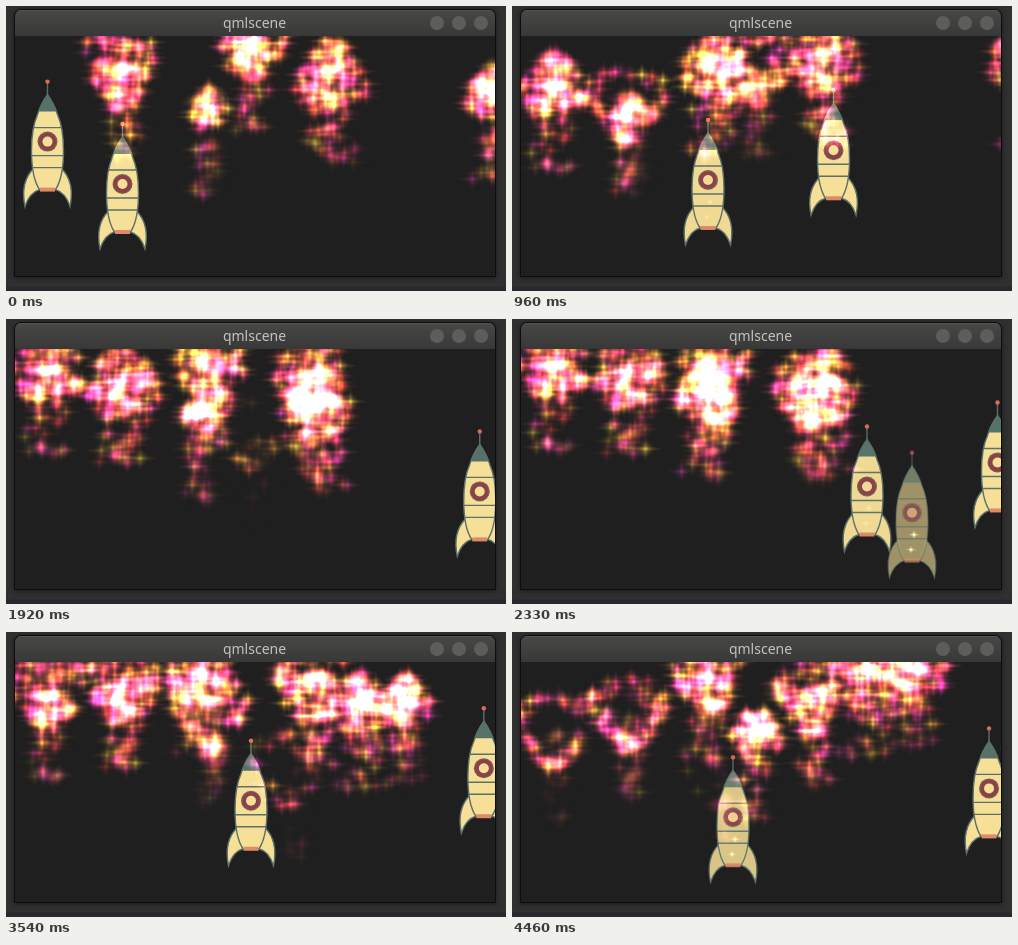
An HTML page with a canvas for the animation above (4.5 s loop, 500 by 285 pixels).

```html
<!DOCTYPE html>
<html lang="en">
<head>
<meta charset="utf-8">
<title>Rockets</title>
<style>
  html, body { margin: 0; width: 100%; height: 100%; overflow: hidden; }
  body { position: relative; background: linear-gradient(#303030 280px, #2a282e 281px); }
  .window {
    position: absolute; left: 9px; top: 4px; width: 480px; height: 266px;
    border-radius: 6px 6px 0 0; background: #1f1f1f; overflow: hidden;
  }
  .shadow {
    position: absolute; left: 8px; top: 3px; width: 482px; height: 268px;
    border-radius: 7px 7px 0 0; background: #0d0d0d; box-shadow: 0 1px 5px #1a1a1a;
  }
  .bar {
    position: absolute; left: 0; top: 0; width: 100%; height: 26px;
    background: linear-gradient(#484846, #383838); box-shadow: inset 0 1px #555;
  }
  .bar span {
    position: absolute; left: 0; width: 479px; top: 0; text-align: center;
    font: 14px/26px "Noto Sans", "Open Sans", sans-serif; color: #c2c2be;
  }
  .bar i {
    position: absolute; top: 6px; width: 14px; height: 14px;
    border-radius: 50%; background: #5d5d5c;
  }
  canvas { position: absolute; left: 0; top: 26px; }
</style>
</head>
<body>
<div class="shadow"></div>
<div class="window">
  <div class="bar"><span>qmlscene</span>
    <i style="left:415px"></i><i style="left:437px"></i><i style="left:459px"></i>
  </div>
  <canvas width="480" height="240"></canvas>
</div>
<script>
const ctx = document.querySelector('canvas').getContext('2d');
const LOOP = 4500;
const clamp = v => Math.min(1, Math.max(0, v));

// The picture moves in half-second runs of short steps and rests between them.
const RUNS = [40, 580, 1210, 1790, 2330, 2880, 3420, 3960];
const RUN = 500, STEP = 40;

function stepTime(t) {
  const from = RUNS.filter(r => r <= t).pop();
  if (from === undefined) return 0;
  const past = t - from;
  return from + (past >= RUN ? RUN : Math.floor(past / STEP) * STEP);
}

function seeded(seed) {
  return () => {
    seed = (seed + 0x6D2B79F5) | 0;
    let n = Math.imul(seed ^ (seed >>> 15), 1 | seed);
    n = (n + Math.imul(n ^ (n >>> 7), 61 | n)) ^ n;
    return ((n ^ (n >>> 14)) >>> 0) / 4294967296;
  };
}

// ---- launches ----
const DRAG = 21;      // half the slowing, px/s²
const CENTRE = 60;    // from antenna tip to porthole
const launches = [];

// born in ms, x and antenna y at birth, speed in px/s, sideways pull, life in s
function launch(born, x, y, speed = 120, wind = 0, life = 1) {
  const rnd = seeded(launches.length * 977 + 31);
  const sparks = Array.from({ length: 165 }, (_, i) => ({
    tail: i >= 110,
    angle: rnd() * Math.PI * 2,
    u: rnd(), v: rnd(), w: rnd(),
    hue: Math.floor(rnd() * HUES)
  }));
  launches.push({ born, x, y, speed, wind, life, sparks });
}

const place = (l, age) => ({
  x: l.x + l.wind * age * age,
  y: l.y - l.speed * age + DRAG * age * age
});

// ---- sparks ----
const SIZE = 36, HUES = 9;

function makeSpark(color) {
  const c = document.createElement('canvas');
  c.width = c.height = SIZE;
  const g = c.getContext('2d');
  g.globalCompositeOperation = 'lighter';
  g.translate(SIZE / 2, SIZE / 2);
  const glow = (rx, ry, alpha) => {
    const grad = g.createRadialGradient(0, 0, 0, 0, 0, 1);
    grad.addColorStop(0, `hsla(${color},${alpha})`);
    grad.addColorStop(0.4, `hsla(${color},${alpha * 0.45})`);
    grad.addColorStop(1, `hsla(${color},0)`);
    g.save();
    g.scale(rx, ry);
    g.fillStyle = grad;
    g.fillRect(-1, -1, 2, 2);
    g.restore();
  };
  glow(8, 8, 0.55);
  glow(17, 2.4, 0.45);
  glow(2.4, 13, 0.45);
  return c;
}

// Hues run from magenta through red to yellow.
const SPARKS = Array.from({ length: HUES },
  (_, i) => makeSpark(`${320 + i * 85 / (HUES - 1)},95%,62%`));
const WHITE = makeSpark('50,100%,92%');

function drawSpark(img, x, y, alpha, size = SIZE) {
  if (alpha < 0.01) return;
  ctx.globalAlpha = Math.min(1, alpha);
  ctx.drawImage(img, x - size / 2, y - size / 2, size, size);
}

// ---- bursts: rise, fall back, and thin out into a ring ----
const FLIGHT = 4.4, RISE = 70, SPREAD = 36, TAIL = 90;

function drawBurst(l, t) {
  const age = (t - l.born) / 1000 - l.life;
  if (age <= 0 || age > 5) return;
  const from = place(l, l.life);
  const u = age / FLIGHT;
  const x = from.x + 2 * l.wind * l.life * age;
  const y = from.y + CENTRE - RISE * 4 * u * (1 - u);
  const rx = SPREAD * (1 - Math.exp(-age / 0.35));
  const ry = rx * 1.1;
  const lean = 0.6 * Math.cos(Math.PI * Math.min(1, u));
  const hollow = 0.65 * clamp((age - 3.2) / 0.8);

  for (const s of l.sparks) {
    const lit = clamp((age - s.w * 0.4) / 0.15) * clamp((3.4 + s.v * 1.7 - age) / 0.5);
    const alpha = lit * (0.75 + 0.25 * Math.sin(t / 130 + s.w * 40));
    const img = SPARKS[s.hue];
    if (s.tail) {
      const fall = Math.pow(s.u, 1.2);
      const side = (s.v + s.w - 1) * rx * (0.75 + 0.4 * lean);
      drawSpark(img, x + side, y + TAIL * fall, alpha * (0.95 - 0.55 * fall) * (1 - hollow));
    } else {
      const r = hollow + (1 - hollow) * Math.pow(s.u, 0.65);
      const down = r * Math.sin(s.angle);
      drawSpark(img, x + rx * r * Math.cos(s.angle) * (1 + lean * down), y + ry * down, alpha * 0.9);
    }
  }
}

// ---- rocket, drawn from the antenna tip down ----
const shape = d => new Path2D(d);
const STALK = shape('M0 1V15');
const BODY = shape('M0 13C-5 20-8 26-10 33C-15 44-16 56-16 69C-16 85-14 99-8 108H8C14 99 16 85 16 69C16 56 15 44 10 33C8 26 5 20 0 13Z');
const NOSE = shape('M0 13C-5 20-7 25-9 30H9C7 25 5 20 0 13Z');
const BANDS = shape('M-14 46H14M-16 74H16M-15 86H15');
const FIN = shape('M-14 87C-22 95-26 108-22.5 125C-20 117-15 110-8 108C-11 102-13 96-14 87Z');
const LINE = '#5b716a', CREAM = '#f6df97';

function dot(x, y, r, color) {
  ctx.fillStyle = color;
  ctx.beginPath();
  ctx.arc(x, y, r, 0, Math.PI * 2);
  ctx.fill();
}

function outlined(path) {
  ctx.fillStyle = CREAM;
  ctx.fill(path);
  ctx.stroke(path);
}

function paintRocket() {
  ctx.strokeStyle = LINE;
  ctx.lineWidth = 1.4;
  ctx.stroke(STALK);
  for (const side of [1, -1]) {
    ctx.save();
    ctx.scale(side, 1);
    outlined(FIN);
    ctx.restore();
  }
  outlined(BODY);
  ctx.fillStyle = '#55716a';
  ctx.fill(NOSE);
  ctx.stroke(BANDS);
  ctx.fillStyle = '#e18a68';
  ctx.fillRect(-7.5, 106, 15, 4);
  dot(0, CENTRE, 10, '#786058');
  dot(0, CENTRE, 8.8, '#8c4148');
  dot(0, CENTRE, 5, CREAM);
  dot(0, 0, 2.2, '#e06a55');
}

function drawRocket(l, t) {
  const age = (t - l.born) / 1000;
  if (age < 0 || age >= l.life) return;
  const { x, y } = place(l, age);
  const fade = clamp(age / 0.3);
  ctx.globalAlpha = Math.min(fade, clamp((l.life - age) / 0.12));
  ctx.save();
  ctx.translate(x, y);
  paintRocket();
  ctx.restore();
  if (fade < 1) {
    ctx.globalCompositeOperation = 'lighter';
    const alpha = 3 * fade * (1 - fade);
    drawSpark(WHITE, x + 2, y + 82, alpha, 16);
    drawSpark(WHITE, x - 1, y + 97, alpha, 14);
    ctx.globalCompositeOperation = 'source-over';
  }
}

// already burst when the loop begins
launch(-4200, 116, 155);
launch(-3700, 245, 140);
launch(-2100, 344, 161, 120, -6);
launch(-1450, 462, 150, 120, 14);
launch(-1250, 204, 154);
// seen in flight
launch(-730, 41.5, 152);
launch(-300, 116.5, 150, 113);
launch(240, 323, 158, 120, -3);
launch(650, 196, 147);
launch(1120, 465, 187, 111, 14, 3);
launch(2040, 355, 142, 125);
launch(2150, 400, 160, 150);
launch(2620, 466, 184.5, 137, 14, 3);
launch(3100, 245, 157.5);
launch(3750, 470, 171, 120, 14, 3);
launch(4200, 221, 155);

function draw(t) {
  ctx.setTransform(1, 0, 0, 1, -9, -30);
  ctx.globalAlpha = 1;
  ctx.globalCompositeOperation = 'source-over';
  ctx.clearRect(9, 30, 480, 240);
  launches.forEach(l => drawRocket(l, t));
  ctx.globalCompositeOperation = 'lighter';
  launches.forEach(l => drawBurst(l, t));
}

const start = performance.now();
let shown = -1;
function tick() {
  const t = stepTime((performance.now() - start) % LOOP);
  if (t !== shown) draw(shown = t);
  requestAnimationFrame(tick);
}
tick();
</script>
</body>
</html>
```
